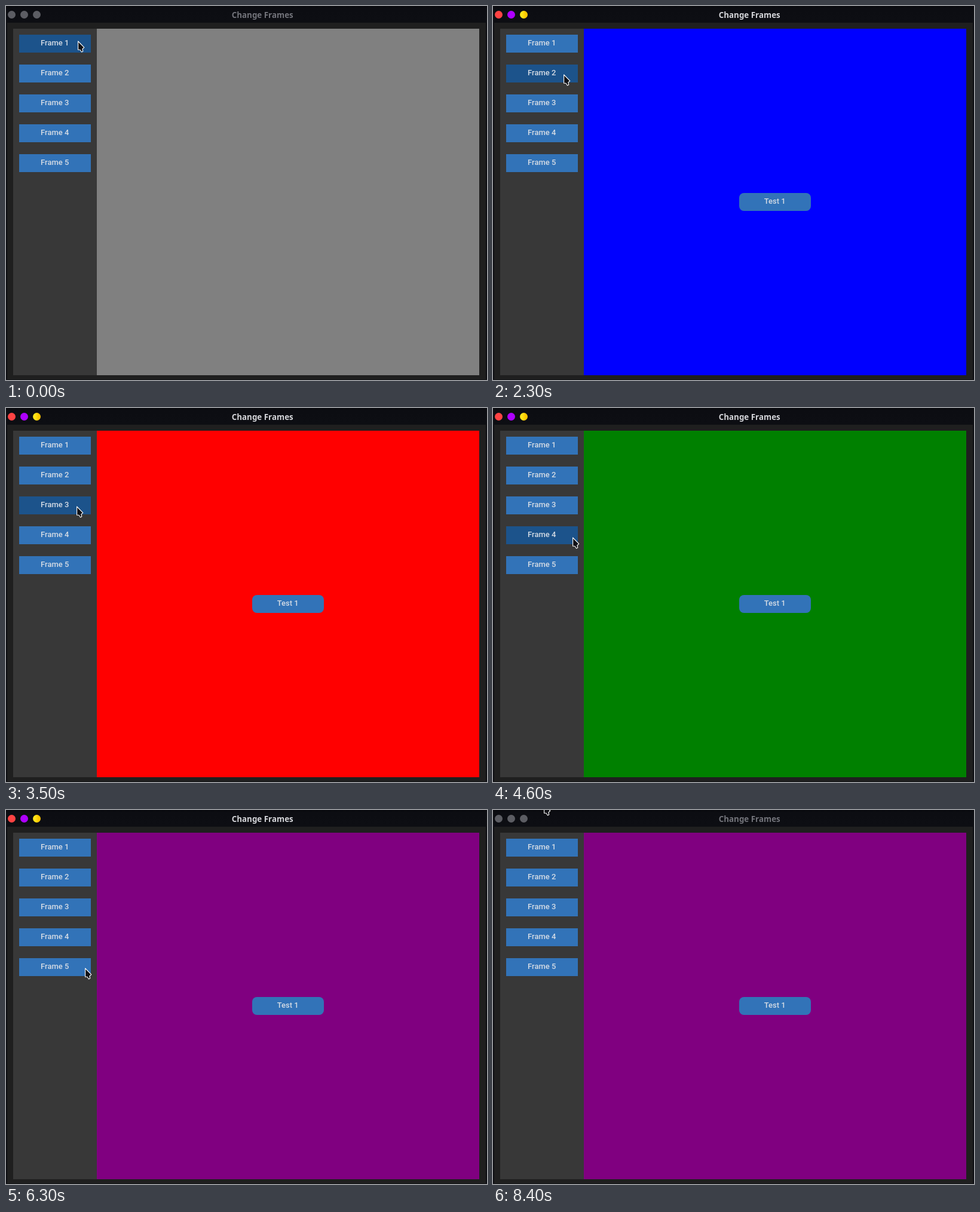
Write an HTML page with a canvas that moves like this. It is 805x626 px and loops after 8.6 s.

```html
<!DOCTYPE html>
<html lang="en">
<head>
<meta charset="utf-8">
<title>Change Frames</title>
<style>
  html, body { margin: 0; width: 100%; height: 100%; overflow: hidden; background: #1f1f1f; }
  canvas { display: block; }
</style>
</head>
<body>
<canvas id="stage" width="805" height="626"></canvas>
<script>
const ctx = document.getElementById('stage').getContext('2d');
const LOOP = 8600, STEP = 100;

// Each click shows a panel colour and flashes the button for one step.
const clicks = [
  { at: 1400, color: '#0000ff' },
  { at: 2700, color: '#ff0000' },
  { at: 3900, color: '#008000' },
  { at: 5100, color: '#000000' },
  { at: 6300, color: '#800080' }
];

// Pointer tip: time, x, y
const path = [
  [0, 120, 58], [1900, 120, 58],
  [2300, 118, 114], [2900, 118, 114],
  [3500, 118, 164], [4100, 118, 164],
  [4400, 134, 215], [4500, 134, 215],
  [4600, 133, 216], [5200, 133, 216],
  [5700, 132, 264], [6400, 132, 264],
  [7100, 159, 131], [7500, 150, 42],
  [7900, 85, -10], [LOOP, 85, -10]
];

const ease = p => p * p * (3 - 2 * p);

function pointerAt(t) {
  const i = path.findIndex(k => k[0] > t);
  const [t0, x0, y0] = path[i - 1], [t1, x1, y1] = path[i];
  const p = ease((t - t0) / (t1 - t0));
  return { x: Math.round(x0 + (x1 - x0) * p), y: Math.round(y0 + (y1 - y0) * p) };
}

function rect(color, x, y, w, h) {
  ctx.fillStyle = color;
  ctx.fillRect(x, y, w, h);
}

function label(text, x, y, font, color) {
  ctx.font = font;
  ctx.fillStyle = color;
  ctx.textAlign = 'center';
  ctx.fillText(text, x, y);
}

function button(text, x, y, color, radius) {
  ctx.fillStyle = color;
  ctx.beginPath();
  ctx.roundRect(x, y, 120, 30, radius);
  ctx.fill();
  label(text, x + 59.7, y + 18, '500 13px Roboto, sans-serif', '#d5dce5');
}

function dot(x, color) {
  ctx.fillStyle = color;
  ctx.beginPath();
  ctx.arc(x, 14.5, 6.5, 0, Math.PI * 2);
  ctx.fill();
}

function titleBar(active) {
  const bar = ctx.createLinearGradient(0, 0, 0, 28);
  bar.addColorStop(0, '#08090d');
  bar.addColorStop(0.15, '#0c0d12');
  bar.addColorStop(1, '#0d0e13');
  rect(bar, 0, 0, 805, 28);
  const gold = ctx.createLinearGradient(45, 0, 58, 0);
  gold.addColorStop(0.3, '#ffe619');
  gold.addColorStop(0.7, '#ffc800');
  ['#ff4343', '#ae00ff', gold].forEach((c, i) => dot(9.5 + i * 21, active ? c : '#5c5d63'));
  label('Change Frames', 429.2, 20, '600 13.4px "Noto Sans", "Open Sans", sans-serif',
    active ? '#d3d4d8' : '#72737a');
}

function pointer({ x, y }) {
  ctx.save();
  ctx.translate(x, y);
  ctx.beginPath();
  ctx.moveTo(0.6, 1);
  ctx.lineTo(0.6, 15.3);
  ctx.lineTo(4, 15.3);
  ctx.lineTo(6.5, 19);
  ctx.lineTo(8.8, 17.8);
  ctx.lineTo(7.9, 14);
  ctx.lineTo(10.8, 11.3);
  ctx.closePath();
  ctx.fillStyle = '#101116';
  ctx.fill();
  ctx.strokeStyle = '#ffffff';
  ctx.lineWidth = 1.1;
  ctx.lineJoin = 'round';
  ctx.stroke();
  ctx.restore();
}

function draw(time) {
  const t = Math.floor(time % LOOP / STEP) * STEP;
  const tip = pointerAt(t);
  const last = clicks.findLastIndex(c => c.at <= t);

  rect('#1f1f1f', 0, 0, 805, 626);
  titleBar(t >= 1400 && t < 8400);
  rect('#0c0d12', 0, 28, 2, 598);
  rect('#0c0d12', 803, 28, 2, 598);
  rect('#131417', 0, 625, 805, 1);
  rect('#383838', 12, 38, 140, 580);
  rect(last < 0 ? '#808080' : clicks[last].color, 152, 38, 640, 580);

  for (let i = 0; i < 5; i++) {
    const y = 48 + i * 50;
    const over = tip.x >= 22 && tip.x < 142 && tip.y >= y && tip.y < y + 30;
    const flash = t >= clicks[i].at && t < clicks[i].at + STEP;
    button('Frame ' + (i + 1), 22, y, over && !flash ? '#1c538b' : '#3273b8', 0);
  }
  if (last >= 0) button('Test 1', 412, 313, '#3273b8', 8);
  pointer(tip);
}

const start = performance.now();
function tick() {
  draw(performance.now() - start);
  requestAnimationFrame(tick);
}
tick();
</script>
</body>
</html>
```
